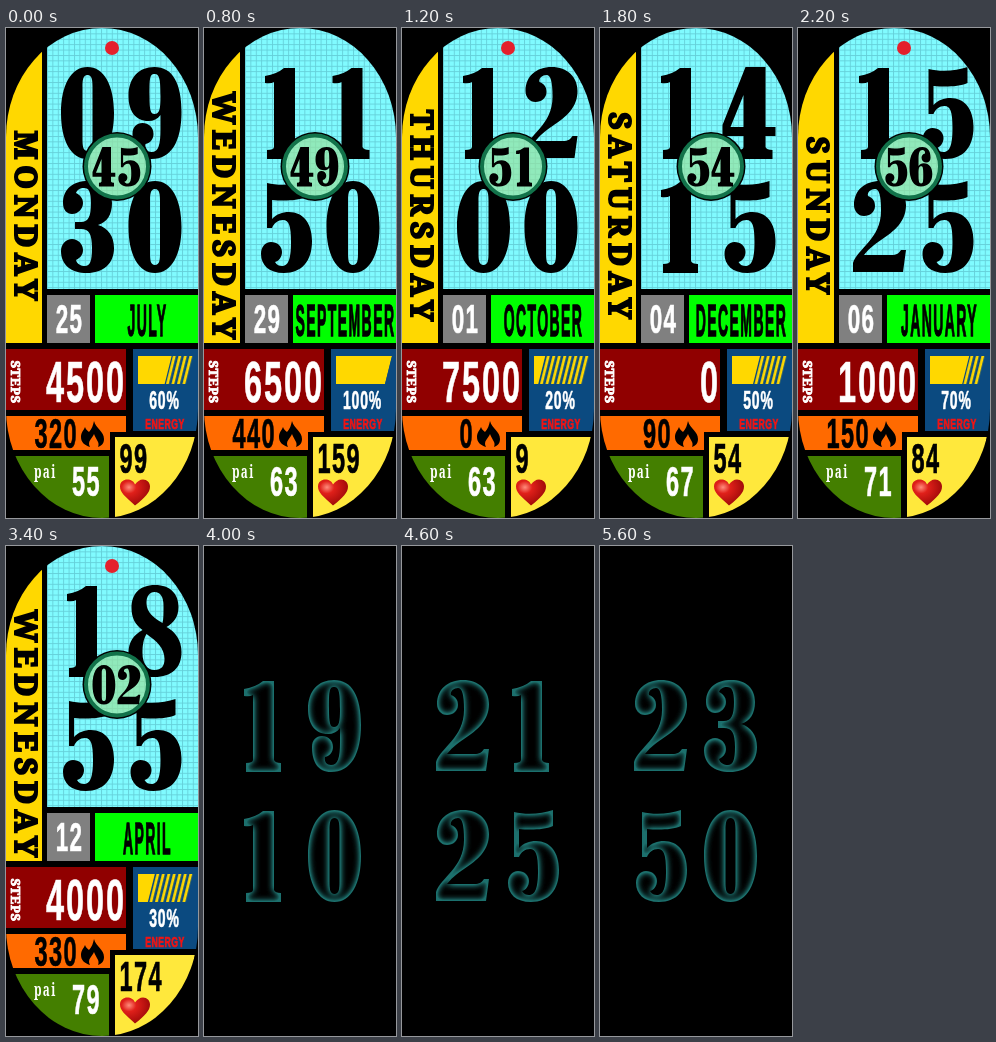
An HTML page that plays this animation: 192x490 px, repeating every 5800 ms.

```html
<!DOCTYPE html>
<html lang="en">
<head>
<meta charset="utf-8">
<title>Watch face</title>
<style>
  html, body { margin: 0; width: 100%; height: 100%; overflow: hidden; background: #000; }
  svg { display: block; width: 192px; height: 490px; }
  .cond { font: bold 42px "Liberation Sans", Arial, sans-serif; letter-spacing: .06em; stroke: #000; stroke-width: .6px; vector-effect: non-scaling-stroke; }
  .slab { font: 900 30px "Noto Serif", serif; stroke: #000; stroke-width: 2px; }
  .white { fill: #fff; stroke: #fff; }
  .red { fill: #f01414; stroke: #f01414; }
  .end { text-anchor: end; }
  .mid { text-anchor: middle; }
  .small { font-size: 13px; letter-spacing: .6px; stroke-width: .9px; }
  #day { letter-spacing: 6px; }
  #date { font-size: 40px; }
  #steps { font-size: 58px; }
  #month { font-size: 44.5px; letter-spacing: .1em; stroke-width: 1.1px; }
  #energy { font-size: 25px; }
  path { fill-rule: evenodd; }
</style>
</head>
<body>
<svg viewBox="0 0 192 490">
  <defs>
    <clipPath id="capsule"><rect width="192" height="490" rx="96" ry="109"/></clipPath>
    <clipPath id="gauge"><path d="M132 328H188L181 356H132Z"/></clipPath>
    <pattern id="grid" x="41" width="5.400" height="5.400" patternUnits="userSpaceOnUse">
      <rect width="5.400" height="5.400" fill="#80fbff"/>
      <path d="M0 .5H5.400M.5 0V5.400" stroke="#64cfd8" stroke-width=".9"/>
    </pattern>
    <pattern id="hatch" width="5.500" height="28" patternUnits="userSpaceOnUse" patternTransform="translate(132 328) skewX(-14)">
      <rect x="2" width="2.800" height="28" fill="#ffd800"/>
    </pattern>
    <radialGradient id="ruby" cx=".3" cy=".3" r=".8">
      <stop offset="0" stop-color="#ff8c7c"/>
      <stop offset=".3" stop-color="#e0201a"/>
      <stop offset="1" stop-color="#960606"/>
    </radialGradient>
    <filter id="rim" x="-10%" y="-10%" width="120%" height="120%" color-interpolation-filters="sRGB">
      <feFlood flood-color="#1c706d"/>
      <feComposite operator="out" in2="SourceAlpha"/>
      <feGaussianBlur stdDeviation="3.600"/>
      <feComponentTransfer><feFuncA type="linear" slope="2.300"/></feComponentTransfer>
      <feComposite operator="in" in2="SourceAlpha"/>
    </filter>
  </defs>

  <rect width="192" height="490"/>

  <g id="active" clip-path="url(#capsule)">
    <rect width="36" height="315" fill="#ffd800"/>
    <rect x="41" width="151" height="261" fill="url(#grid)"/>
    <rect x="41" y="267" width="43" height="48" fill="#808080"/>
    <rect x="89" y="267" width="103" height="48" fill="#0f0"/>
    <rect y="321" width="120" height="61" fill="#900000"/>
    <rect x="127" y="321" width="65" height="82" fill="#0b4a80"/>
    <rect y="388" width="120" height="34" fill="#ff6a00"/>
    <rect y="428" width="103" height="62" fill="#447f00"/>
    <rect x="104" y="404" width="88" height="86"/>
    <rect x="109" y="409" width="83" height="81" fill="#ffe83c"/>

    <circle id="link" cx="106" cy="20" r="7" fill="#e4202c"/>
    <g id="clock"></g>
    <circle cx="111" cy="138.500" r="34.500"/>
    <circle cx="111" cy="138.500" r="31" fill="url(#grid)"/>
    <circle cx="111" cy="138.500" r="31" fill="#97e39e" fill-opacity=".7" stroke="#12724a" stroke-width="4"/>
    <g id="seconds"></g>

    <text id="day" class="slab mid" transform="translate(9 190.500) rotate(90)"></text>
    <text id="date" class="cond white mid" transform="translate(63.500 305) scale(.56 1)"></text>
    <text id="month" class="cond mid" transform="translate(141.500 307.500) scale(.315 1)"></text>

    <text class="slab white small" transform="translate(4.500 332.500) rotate(90)">STEPS</text>
    <text id="steps" class="cond white end" transform="translate(120 374) scale(.56 1)"></text>

    <g clip-path="url(#gauge)">
      <rect x="132" y="328" width="60" height="28" fill="url(#hatch)"/>
      <path id="level" fill="#ffd800"/>
    </g>
    <text id="energy" class="cond white mid" transform="translate(158.500 381) scale(.56 1)"></text>
    <text class="cond red mid" style="font-size:15.500px" transform="translate(159 400.500) scale(.56 1)">ENERGY</text>

    <text id="kcal" class="cond end" transform="translate(72 420) scale(.56 1)"></text>
    <path d="M88 393C90 401 98 403 98 411C98 416 95 418 92 419C94 414 90 412 88 406C86 411 81 413 84 419C78 417 75 414 75 409C75 404 78 402 79 399C80 402 82 403 83 404C86 401 87 397 88 393Z"/>

    <text class="slab white" style="font-size:18px;font-weight:700;letter-spacing:2px;stroke:none" transform="translate(28 450) scale(.65 1)">pai</text>
    <text id="pai" class="cond white mid" transform="translate(80.500 468) scale(.56 1)"></text>

    <text id="pulse" class="cond" transform="translate(113.500 444.500) scale(.56 1)"></text>
    <path fill="url(#ruby)" transform="translate(1 -1.500)" d="M128 479C118 470 113 466 113 460C113 455 117 453 120 453C124 453 127 455 128 458C130 455 133 453 136 453C140 453 143 456 143 460C143 466 138 471 128 479Z"/>
  </g>

  <g id="idle" filter="url(#rim)"></g>
</svg>

<script>
const STEP = 200, LOOP = 5800, IDLE_FROM = 20;
const DAYS = "MONDAY TUESDAY WEDNESDAY THURSDAY FRIDAY SATURDAY SUNDAY".split(" ");
const MONTHS = "JANUARY FEBRUARU MARCH APRIL MAY JUNE JULY AUGUST SEPTEMBER OCTOBER NOVEMBER DECEMBER".split(" ");

// Fat-face numerals, each in a 53 x 92 cell
const SIX = "M49 25C49 32 45 36 39 36C33 36 28 32 28 25C28 20 31 16 36 15C37 10 34 7 30 7C23 7 21 14 21 30V44C24 40 28 38 33 38C46 38 53 48 53 63C53 81 43 92 27 92C9 92 0 76 0 47C0 18 10 0 30 0C43 0 49 10 49 25ZM27 45C22 45 21 50 21 63C21 80 22 85 27 85C32 85 32 80 32 63C32 49 31 45 27 45Z";
const GLYPHS = [
  "M26.5 0C43 0 53 18 53 46S43 92 26.5 92S0 74 0 46S10 0 26.5 0ZM26.5 8C22 8 21.5 13 21.5 20V72C21.5 79 22 84 26.5 84S31.5 79 31.5 72V20C31.5 13 31 8 26.5 8Z",
  "M36 1V80Q37 83 43 83V92H8V83Q15 83 15 80V15Q12 17 6 16V9Q18 7 25 1Z",
  "M0 91V82C4 68 28 58 28 30C28 14 26 8 22 8C18 8 14 11 15 15C20 17 22 20 22 25C22 31 17 35 11 35C5 35 1 30 1 24C1 9 12 0 27 0C43 0 53 10 53 24C53 40 42 50 28 59C20 64 14 70 11 74H38C44 74 46 72 48 69H53L50 91Z",
  "M2 22C2 8 12 0 27 0C42 0 51 8 51 22C51 34 46 41 37 44C47 47 53 55 53 67C53 83 42 92 26 92C10 92 0 84 0 70C0 63 5 58 11 58C17 58 22 63 22 69C22 74 19 77 15 79C16 83 20 85 24 85C29 85 31 80 31 67C31 53 28 48 20 48H14V41H20C27 41 30 36 30 22C30 11 28 7 23 7C19 7 16 9 15 12C19 14 22 17 22 22C22 28 17 33 11 33C6 33 2 29 2 22Z",
  "M43 0V60H53V69H43V80Q44 83 50 83V92H15V83Q21 83 21 80V69H0V58L23 0ZM21 28L8 60H21Z",
  "M8 2C20 5 36 4 47 0V16C38 20 24 20 13 19V38C18 33 23 31 30 31C44 31 53 42 53 60C53 80 43 92 25 92C10 92 2 84 2 73C2 66 6 61 12 61C18 61 23 65 23 71C23 76 20 80 16 81C18 84 20 85 23 85C29 85 32 79 32 61C32 45 30 39 24 39C19 39 15 42 13 47H8Z",
  SIX,
  "M0 1H53V12C44 32 37 56 37 92H14C14 64 28 42 42 22H14C9 22 7 25 5 30H0Z",
  "M26.5 0C42 0 50 9 50 22C50 32 45 38 38 42C47 47 53 55 53 67C53 83 43 92 26 92C9 92 0 83 0 68C0 57 5 50 14 45C7 40 3 33 3 23C3 9 11 0 26.5 0ZM26 7C21 7 18 11 18 18C18 27 25 33 34 38C35 34 35 28 35 21C35 12 32 7 26 7ZM18 49C15 54 14 60 14 68C14 79 19 85 26 85C33 85 36 81 36 74C36 63 28 56 18 49Z",
  SIX
];

const $ = id => document.getElementById(id);
const two = n => String(n).padStart(2, "0");
const show = (id, text) => { $(id).textContent = text; };

function numerals(id, digits, xs, ys, scale = 1) {
  $(id).innerHTML = [...digits].map((c, k) => {
    const turn = c === "9" ? " rotate(180 26.5 46)" : "";
    return `<path d="${GLYPHS[c]}" transform="translate(${xs[k % 2]} ${ys[k >> 1]}) scale(${scale})${turn}"/>`;
  }).join("");
}

function draw(i) {
  const half = Math.ceil(i / 2);
  const time = two(9 + half) + two((30 + 5 * i) % 60);
  const idle = i >= IDLE_FROM;
  $("active").style.display = idle ? "none" : "";
  $("idle").style.display = idle ? "" : "none";
  if (idle) {
    numerals("idle", time, [34, 104], [134, 264]);
    return;
  }

  numerals("clock", time, [55, 122.5], [39, 153]);
  numerals("seconds", two((45 + i) % 60), [86.5, 111.5], [119], .43);
  $("link").style.display = half % 3 ? "none" : "";

  show("day", DAYS[half % 7]);
  show("date", two((24 + i) % 30 + 1));
  show("month", MONTHS[(6 + half) % 12]);
  show("steps", (4500 + 500 * i) % 9000);
  show("kcal", (320 + 30 * i) % 500);
  show("pai", 55 + 4 * Math.ceil(i / 3));
  show("pulse", (99 + 15 * i) % 180);

  const charge = (50 + 10 * i) % 100 + 10;
  const edge = 132 + charge * .56;
  show("energy", charge + "%");
  $("level").setAttribute("d", `M132 328H${edge}L${edge - 7} 356H132Z`);
}

const start = performance.now();
let last = -1;
function tick() {
  const i = Math.floor((performance.now() - start) % LOOP / STEP);
  if (i !== last) draw(last = i);
  requestAnimationFrame(tick);
}
tick();
</script>
</body>
</html>
```
